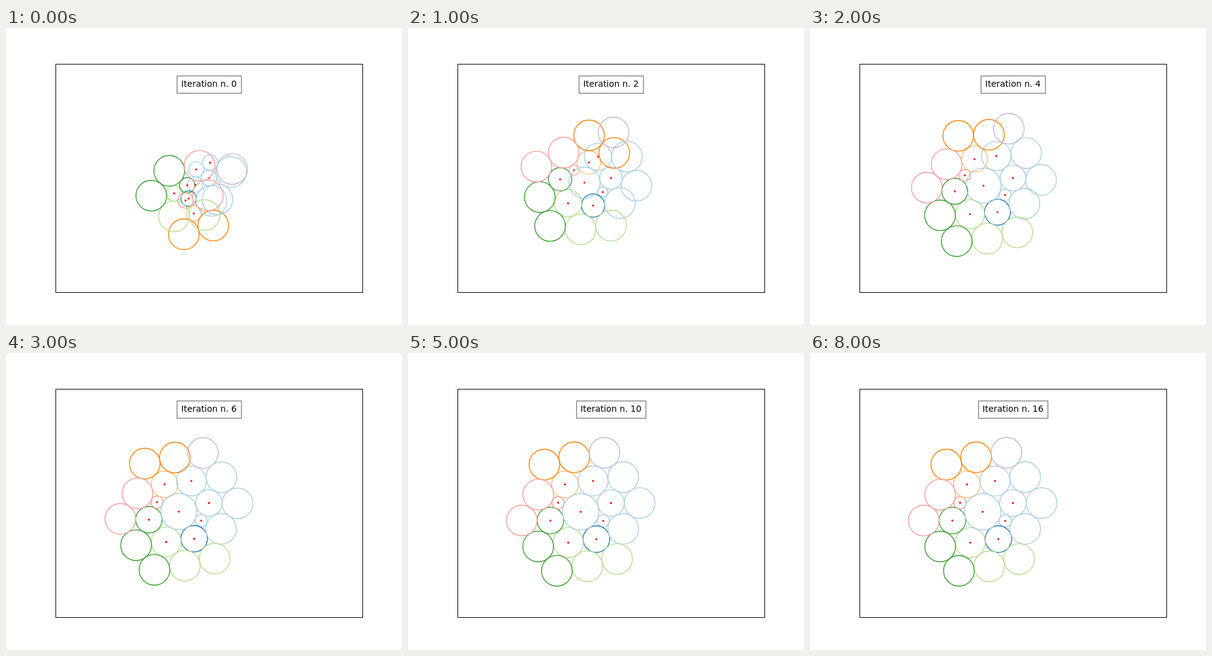
Animation, 640 px wide and 480 px high, one loop 8500 ms. Source, as an HTML page with a canvas:

```html
<!DOCTYPE html>
<html>
<head>
<meta charset="utf-8">
<style>
html, body { margin: 0; overflow: hidden; background: #fff; }
canvas { display: block; }
</style>
</head>
<body>
<canvas id="stage" width="640" height="480"></canvas>
<script>
const ctx = document.getElementById('stage').getContext('2d');
const STEP = 500, COUNT = 17, UNIT = 24.8, CX = 328, CY = 242.4;

// Clockwise neighbours of each inner circle (capitals); lower case is the rim, radius 1.
const flowers = {
  C: 'efEDBd', E: 'CfFD', F: 'DEfghG', G: 'DFhijH', H: 'DGjklI',
  I: 'DHlA', A: 'DIlabB', B: 'DAbcdC', D: 'BCEFGHIA'
};
const groups = {
  CEDBdef: '#a6cee3', F: '#1f78b4', Ggh: '#b2df8a', Hij: '#33a02c',
  Ikl: '#fb9a99', A: '#fdbf6f', ab: '#ff7f00', c: '#cab2d6'
};
const names = [...Object.keys(flowers), ...'abcdefghijkl'];
const colorOf = name => groups[Object.keys(groups).find(g => g.includes(name))];

// Angle at the centre of circle r between tangent neighbours x and y.
const angle = (r, x, y) => 2 * Math.asin(Math.sqrt(x * y / ((r + x) * (r + y))));

// One pass of the uniform neighbour update over the inner radii.
function relax(radii) {
  for (const [name, ring] of Object.entries(flowers)) {
    const r = radii[name], k = ring.length;
    let sum = 0;
    for (let i = 0; i < k; i++) sum += angle(r, radii[ring[i]], radii[ring[(i + 1) % k]]);
    const s = Math.sin(sum / (2 * k));
    radii[name] = r * s / (1 - s) * (1 / Math.sin(Math.PI / k) - 1);
  }
}

function layout(radii, n) {
  const pos = { C: [0, 0] };
  const dir = (a, b) => Math.atan2(pos[b][1] - pos[a][1], pos[b][0] - pos[a][0]);
  // Walk round a centre, placing every circle not placed yet.
  function walk(center, path, start = dir(center, path[0]), turn = 1) {
    const r = radii[center], [x, y] = pos[center];
    let a = start;
    for (let i = 1; i < path.length; i++) {
      const next = path[i], d = r + radii[next];
      a += turn * angle(r, radii[path[i - 1]], radii[next]);
      pos[next] ??= [x + d * Math.cos(a), y + d * Math.sin(a)];
    }
  }
  walk('C', 'efEDBde', 0);
  walk('E', 'fF');
  const gap = angle(radii.F, radii.D, radii.E);
  walk('F', 'DGhg', (dir('F', 'D') + dir('F', 'E') - gap) / 2, -1);
  walk('G', 'hijH');
  walk('H', 'jklI');
  walk('I', 'lA');
  walk('A', 'lab');
  walk('B', 'DAbc', dir('B', 'D') + 0.134 / 2 ** n);
  return pos;
}

const radii = Object.fromEntries(names.map(name => [name, flowers[name] ? 0.5 : 1]));
const states = [];
for (let n = 0; n < COUNT; n++) {
  states.push({ radii: { ...radii }, pos: layout(radii, n) });
  relax(radii);
}

function disc(x, y, r) {
  ctx.beginPath();
  ctx.arc(x, y, r, 0, 2 * Math.PI);
}

function draw(n) {
  const { radii, pos } = states[n];
  ctx.fillStyle = '#fff';
  ctx.fillRect(0, 0, 640, 480);
  ctx.lineWidth = 1.39;
  for (const name of names) {
    const x = CX + UNIT * pos[name][0], y = CY + UNIT * pos[name][1];
    disc(x, y, UNIT * radii[name]);
    ctx.strokeStyle = colorOf(name);
    ctx.stroke();
    if (flowers[name]) {
      disc(x, y, 1.6);
      ctx.fillStyle = '#f00';
      ctx.fill();
    }
  }
  ctx.lineWidth = 1;
  ctx.strokeStyle = '#000';
  ctx.strokeRect(80.5, 58.5, 496, 369);

  const half = n > 9 ? 56 : 52;
  ctx.lineWidth = 1.39;
  ctx.strokeStyle = '#808080';
  ctx.strokeRect(CX + 0.5 - half, 77.5, 2 * half, 28);
  ctx.fillStyle = '#000';
  ctx.font = '13.89px "DejaVu Sans", sans-serif';
  ctx.textAlign = 'center';
  ctx.fillText('Iteration n. ' + n, CX, 95);
}

function frame() {
  draw(Math.floor(performance.now() / STEP) % COUNT);
  requestAnimationFrame(frame);
}
frame();
</script>
</body>
</html>
```
